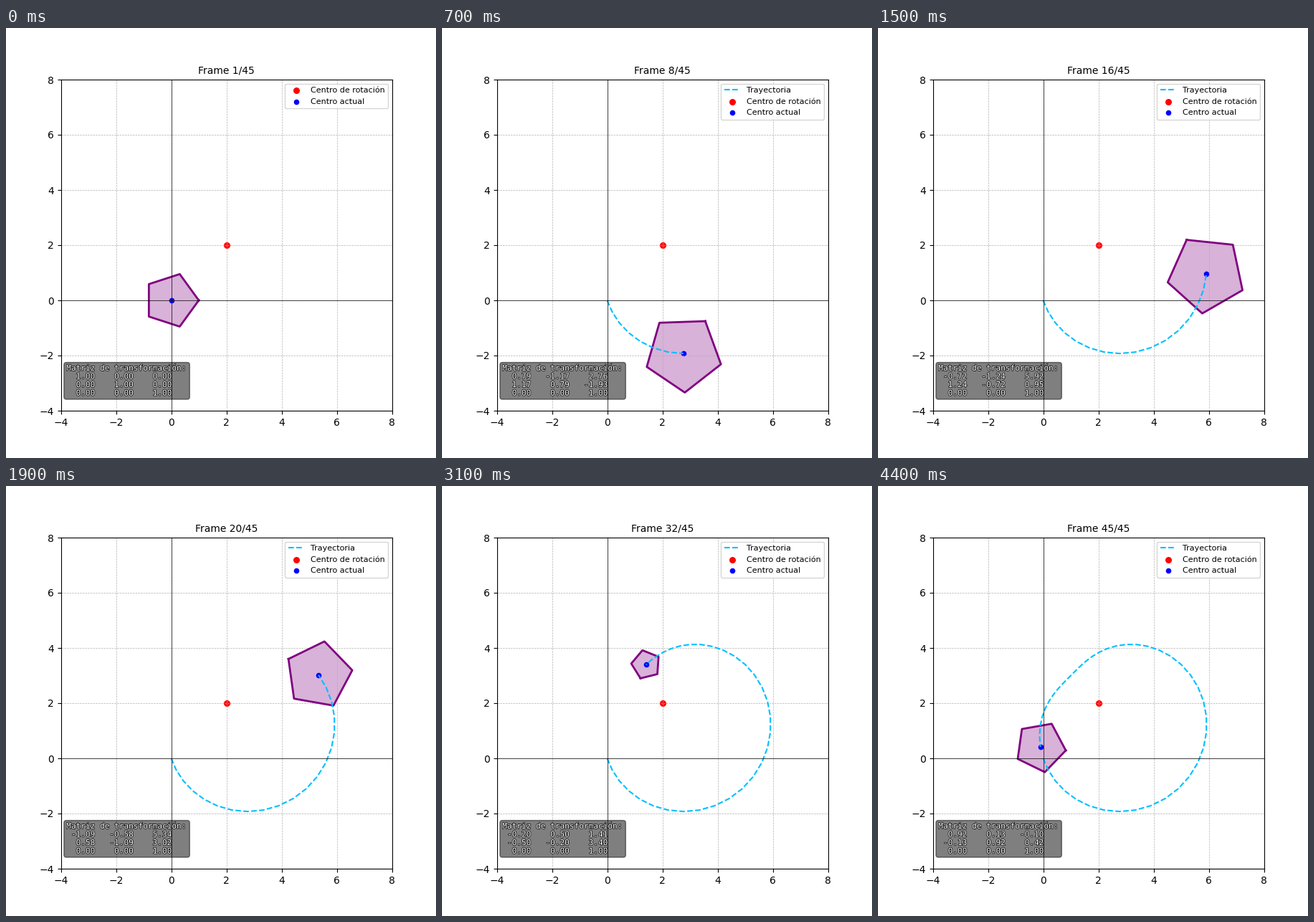
A matplotlib script for the animation above (4.5 s loop, 600x600 px).

```python
import numpy as np
import matplotlib.pyplot as plt
from matplotlib.animation import FuncAnimation
from matplotlib.patheffects import withStroke

FRAMES = 45
INTERVAL = 100
PIVOT = np.array([2.0, 2.0])

corners = np.linspace(0, 2 * np.pi, 6)
PENTAGON = np.array([np.cos(corners), np.sin(corners), np.ones(6)])


def shift(x, y):
    return np.array([[1, 0, x], [0, 1, y], [0, 0, 1.0]])


def transform(i):
    """Turn about the pivot while the scale swells and shrinks."""
    a = 2 * np.pi * i / FRAMES
    s = 1 + 0.5 * np.sin(a)
    c, d = s * np.cos(a), s * np.sin(a)
    spin = np.array([[c, -d, 0], [d, c, 0], [0, 0, 1]])
    return shift(*PIVOT) @ spin @ shift(*-PIVOT)


CENTERS = np.array([transform(i)[:2, 2] for i in range(FRAMES)])


def matrix_text(m):
    rows = ["  ".join(f"{v + 0.0:6.2f}" for v in row) for row in m]
    return "\n".join(["Matriz de transformación:"] + rows)


fig, ax = plt.subplots(figsize=(6, 6), dpi=100)


def draw(i):
    ax.clear()
    ax.set_xlim(-4, 8)
    ax.set_ylim(-4, 8)
    ax.set_aspect("equal")
    ax.grid(True, linestyle="--", linewidth=0.5)

    m = transform(i)
    x, y, _ = m @ PENTAGON
    ax.fill(x, y, color="purple", alpha=0.3)
    ax.plot(x, y, color="purple", linewidth=2)
    if i > 0:
        ax.plot(*CENTERS[:i + 1].T, "--", color="deepskyblue",
                linewidth=1.5, label="Trayectoria")

    ax.scatter(*PIVOT, color="red", s=30, label="Centro de rotación")
    ax.scatter(*CENTERS[i], color="blue", s=20, label="Centro actual")
    ax.axhline(0, color="black", linewidth=0.5)
    ax.axvline(0, color="black", linewidth=0.5)

    ax.text(-3.8, -3.5, matrix_text(m), fontsize=8, color="white",
            family="DejaVu Sans Mono", va="bottom",
            bbox=dict(boxstyle="round", facecolor="black", alpha=0.5),
            path_effects=[withStroke(linewidth=1, foreground="black")])
    ax.set_title(f"Frame {i + 1}/{FRAMES}", fontsize=10)
    ax.legend(loc="upper right", fontsize=8)


anim = FuncAnimation(fig, draw, frames=FRAMES, init_func=lambda: draw(0),
                     interval=INTERVAL, repeat=True, repeat_delay=0)
plt.show()
```
